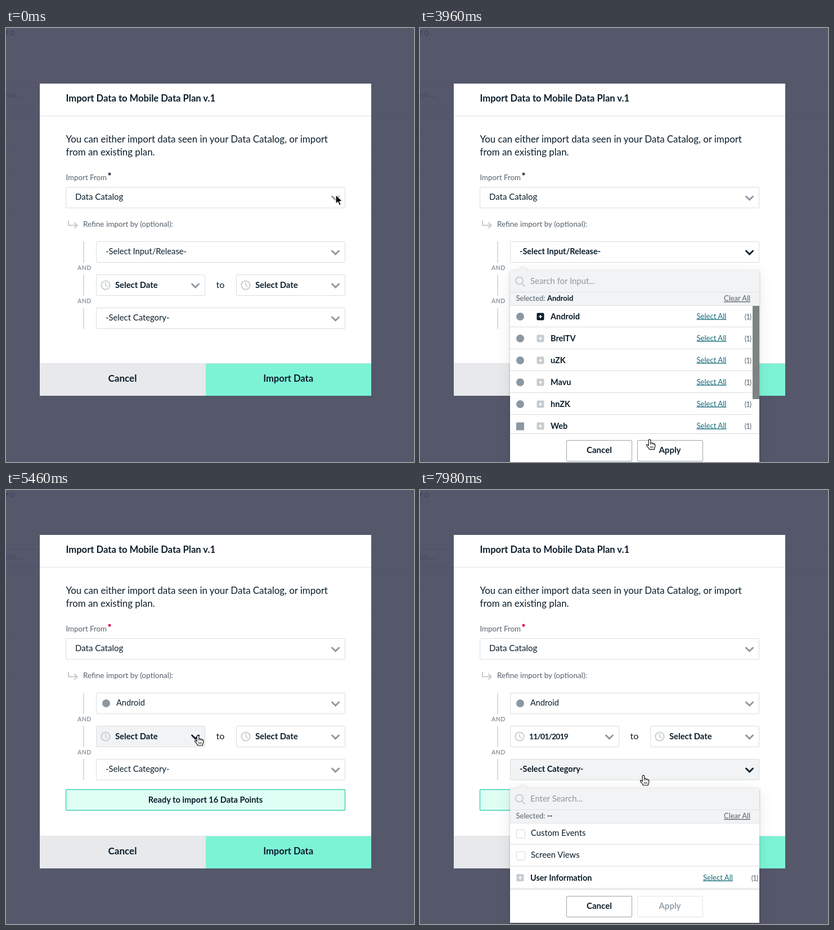
An HTML page for the animation above (8000 ms loop, 725 by 773 pixels).

```html
<!DOCTYPE html>
<html lang="en">
<head>
<meta charset="utf-8">
<title>Import data dialog</title>
<style>
  html, body { margin: 0; width: 100%; height: 100%; overflow: hidden; background: #55576b; }
  svg { display: block; width: 100%; height: 100%; font-family: Lato, "Open Sans", sans-serif; }
  .pop { filter: drop-shadow(0 1px 2px rgba(0,0,0,.22)) drop-shadow(0 6px 14px rgba(0,0,0,.07)); }
</style>
</head>
<body>
<svg id="stage" viewBox="0 0 725 773" preserveAspectRatio="xMinYMin meet"></svg>
<script>
const LOOP = 8000, STEP = 60;
const INK = '#0b1d2a', SLATE = '#55616b', GREY = '#8c98a1', PALE = '#bcc3c8',
      EDGE = '#dadedf', MIST = '#f1f3f5', MINT = '#7df3d6', TEAL = '#146b78', GREEN = '#14cfa2';
const BOLD = 'font-weight="700"', MID = 'text-anchor="middle"', UNDER = 'text-decoration="underline"',
      TIGHT = 'letter-spacing="-.8"';

// Moments at which the dialog changes
const OPEN_INPUT = 1920, PICK = 3240, LOAD_1 = 4080, READY_1 = 4860,
      OPEN_DATE = 5820, LOAD_2 = 6780, READY_2 = 6960, OPEN_CATEGORY = 7980;

// Pointer stops: time, x, y and an optional control point of the way there
const STOPS = [
  [0, 586, 297], [1080, 586, 297], [1560, 585, 395], [2400, 585, 395],
  [3180, 269, 514], [3420, 269, 514], [4020, 412, 739], [4980, 412, 739],
  [5460, 341, 437, 471, 480], [5700, 337, 436], [5880, 337, 436],
  [6660, 331, 576], [7380, 331, 576], [7800, 397, 508]
];
const HAND_TIMES = [[240, 1260], [1400, LOAD_1], [5340, LOAD_2], [7660, LOOP]];

const within = (t, a, b) => t >= a && t < b;
const clamp = v => Math.max(0, Math.min(1, v));
const smooth = v => v * v * (3 - 2 * v);
const pulse = (t, a, b) => clamp((t - a) / 140) * (1 - clamp((t - b) / 140));

const text = (x, y, str, size, fill = INK, more = '') =>
  `<text x="${x}" y="${y}" font-size="${size}" fill="${fill}" ${more}>${str}</text>`;
const rect = (x, y, w, h, fill, more = '') =>
  `<rect x="${x}" y="${y}" width="${w}" height="${h}" fill="${fill}" ${more}/>`;
const line = (d, stroke, width = 1, more = '') =>
  `<path d="${d}" fill="none" stroke="${stroke}" stroke-width="${width}" ${more}/>`;
const dot = (x, y, r, fill) => `<circle cx="${x}" cy="${y}" r="${r}" fill="${fill}"/>`;
const box = (x, y, w, h, fill, stroke, width = 1) =>
  rect(x, y, w, h, fill, `rx="1.5" stroke="${stroke}" stroke-width="${width}"`);
const group = (x, y, body, more = '') => `<g transform="translate(${x} ${y})" ${more}>${body}</g>`;

function chevron(x, y, dark) {
  return line(`M${x - 6} ${y - 3}l6 6l6-6`, dark ? INK : GREY, 3, 'stroke-linecap="round"');
}

function clock(x, y) {
  return `<circle cx="${x}" cy="${y}" r="7.7" fill="none" stroke="#c3c9ce" stroke-width="1.8"/>` +
    line(`M${x} ${y - 5}v5l3.5 3`, '#c3c9ce', 1.6);
}

// Select field; glow runs from 0 (idle) to 1 (hovered)
function field(x, y, w, glow, open) {
  return box(x, y, w, 37, '#fff', EDGE) +
    (glow ? rect(x, y, w, 37, MIST, `rx="1.5" stroke="${EDGE}" opacity="${glow}"`) : '') +
    chevron(x + w - 17, y + 19.5, open || glow > .5);
}

function dateField(x, glow, label, ink) {
  const digits = /\d/.test(label);
  return field(x, 340.5, 193, glow) + clock(x + 16.5, 359) +
    text(x + 33.5, 364, label, digits ? 13.8 : 14.8, ink, digits ? `${BOLD} ${TIGHT}` : BOLD);
}

function backdrop() {
  const rules = [97, 151, 210, 262, 330].map(y => `M0 ${y}.5h725`).join('');
  return rect(0, 0, 725, 773, '#55576b') +
    line(rules, '#4b4e63', 1, 'opacity=".3" stroke-dasharray="2 1"') +
    line('M0 105.5h60M0 137.5h60', '#4b4e63', 1, 'opacity=".3"') +
    text(-1, 13, 'FO', 11, '#3a465e', BOLD + ' letter-spacing="2"') +
    text(-1, 124, 'nts...', 14, '#434b62') + text(-1, 182, '.', 14, '#3a465e');
}

function spinner(t) {
  const half = line('M-14-1A14 14 0 0 1 11.5-7', GREY, 4) +
    line('M14.3-15V-5H4.5', GREY, 3.6, 'stroke-linejoin="round"');
  return `<g transform="translate(355 521) rotate(${(t - 4440) * .18})">` +
    half + `<g transform="rotate(180)">${half}</g></g>`;
}

function dialog(t, s) {
  const ink = s.loading ? '#949fa7' : INK;
  const openInput = within(t, OPEN_INPUT, LOAD_1), openCategory = t >= OPEN_CATEGORY;
  const hover = [pulse(t, 180, 1220), pulse(t, 1390, 2560), pulse(t, 5310, 6120), pulse(t, 7640, 9000)];
  const foot = s.height - 58;
  let out = rect(60, 0, 589, s.height, '#fff') +
    text(106.5, 32, 'Import Data to Mobile Data Plan v.1', 16.6, INK, BOLD) +
    line('M60 57.5H649', '#dfe2e4') +
    text(106.5, 104.5, 'You can either import data seen in your Data Catalog, or import', 16.85) +
    text(106.5, 127.5, 'from an existing plan.', 16.85) +
    text(106.5, 172, 'Import From', 13.3, SLATE) +
    dot(184, 161, 2.5, t < LOAD_1 ? '#454962' : '#dc1f54');

  if (hover[0]) out += rect(104.5, 182.5, 500, 41, '#dfe3e6', `rx="3" opacity="${hover[0] * .5}"`);
  out += field(106.5, 184.5, 496, hover[0]) + text(123, 207, 'Data Catalog', 15) +
    line('M111 244v8.5h15M121.5 247.5l5 5l-5 5', '#c3c9ce', 2) +
    text(137, 255, 'Refine import by (optional):', 13.5, SLATE) +
    line('M138 281v38M138 340v38M138 399v38', '#d9dde0', 2);
  for (const y of [332, 391]) out += text(139.3, y, 'AND', 10.6, GREY, `${BOLD} ${MID} letter-spacing=".3"`);

  out += field(160.5, 281.5, 442, hover[1], openInput);
  out += t < LOAD_1
    ? text(177, 304, '-Select Input/Release-', openInput ? 14.5 : 14.75, INK, openInput ? BOLD : '')
    : dot(178, 300, 7, GREY) + text(196, 304, 'Android', 14.5, ink);

  out += dateField(160.5, hover[2], t < LOAD_2 ? 'Select Date' : '11/01/2019', ink) +
    text(381, 364, 'to', 16, s.loading ? '#6e7a84' : INK, MID) +
    dateField(409.5, 0, 'Select Date', ink) +
    field(160.5, 399.5, 442, hover[3], openCategory) +
    text(177, 422, '-Select Category-', openCategory ? 14.6 : 14.8, ink, openCategory ? BOLD : '');

  if (s.loading) {
    out += spinner(t) + text(354.5, 563.5, 'Loading...', 17.2, PALE, MID);
  } else if (t >= READY_1) {
    out += box(106.5, 453.5, 496, 37, '#defef4', '#3ccfae', 1.4) +
      text(354.5, 476.5, 'Ready to import 16 Data Points', 14.6, INK, `${BOLD} ${MID}`);
  }
  return out + rect(60, foot, 295, 58, '#e7e9eb') +
    rect(355, foot, 294, 58, s.loading ? '#fff' : MINT) +
    line(`M60 ${foot + .5}H649`, '#dfe2e4', 1, s.loading ? '' : 'opacity=".6"') +
    text(207, s.height - 25, 'Cancel', 17, INK, `${BOLD} ${MID}`) +
    text(501.7, s.height - 25, 'Import Data', 16.5, s.loading ? GREY : INK, `${BOLD} ${MID}`);
}

function plusBox(x, y, fill) {
  return rect(x - 6.5, y - 6.5, 13, 13, fill, 'rx="2"') +
    line(`M${x - 3} ${y}h6M${x} ${y - 3}v6`, '#fff', 1.7);
}

// Shared frame of both lists; y = 0 is the top of the select field
function list(hint, chosen, foot, active, rows) {
  return rect(160, 52, 443, foot + 60 - 52, '#fff') +
    `<path d="M174 52.5l9-8l9 8z" fill="${MIST}"/>` + rect(160, 52, 443, 62, MIST) +
    `<circle cx="176.5" cy="70" r="6.5" fill="none" stroke="${PALE}" stroke-width="1.5"/>` +
    line('M181 75l5.5 5.5', PALE, 1.6) +
    text(196, 75.5, hint, 14.9, '#8e979e') +
    line('M160 90.5H603M160 114.5H603', '#dfe3e5') +
    text(170.5, 106, `Selected: <tspan fill="${INK}" ${BOLD}>${chosen}</tspan>`, 13, SLATE) +
    text(587, 106, 'Clear All', 12.9, SLATE, `text-anchor="end" ${UNDER}`) +
    rows + line(`M160 ${foot + .5}H603`, '#d5dadd') +
    box(260.5, foot + 12.5, 116, 37, '#fff', '#9aa4ac') +
    box(386.5, foot + 12.5, 116, 37, '#fff', active ? '#9aa4ac' : '#dfe3e5') +
    text(318.5, foot + 35, 'Cancel', 15, INK, `${BOLD} ${MID}`) +
    text(444, foot + 35, 'Apply', 15, active ? INK : '#949fa7', `${BOLD} ${MID}`);
}

function inputList(t, hoverRow) {
  const names = ['Android', 'BrelTV', 'uZK', 'Mavu', 'hnZK', 'Web'];
  const picked = t >= PICK;
  const rows = names.map((name, i) => {
    const y = 133.5 + 39 * i, lit = i === hoverRow;
    const mark = i === 5 ? rect(171, y - 6, 14, 14, GREY) : dot(178, y + .5, 7, GREY);
    return (lit ? rect(160, y - 18.5, 431, 37, MIST) : '') + mark +
      plusBox(214, y + .5, lit || (picked && i === 0) ? INK : '#c6cbcf') +
      text(232, y + 5, name, 14.5, INK, BOLD) +
      text(491.5, y + 4, 'Select All', 13.1, TEAL, UNDER) +
      text(582.5, y + 5.5, '(1)', 12.5, SLATE, `${MID} ${TIGHT}`) +
      (i < 5 ? line(`M160 ${y + 19}H591`, EDGE) : '');
  }).join('') + rect(591, 115, 12, 166, '#7b8383');
  return list('Search for Input...', picked ? 'Android' : '--', 342, picked, rows);
}

function categoryList() {
  const rows = ['Custom Events', 'Screen Views'].map((name, i) => {
    const y = 132.5 + 39 * i;
    return box(171.5, y - 6.5, 15, 15, '#fff', '#d3d8db') + text(197, y + 4.5, name, 14.8) +
      line(`M160 ${y + 19.5}H603`, EDGE);
  }).join('') + plusBox(178, 211.5, '#c6cbcf') +
    text(196, 216.5, 'User Information', 14.5, INK, BOLD) +
    text(503, 215.5, 'Select All', 13.1, TEAL, UNDER) +
    text(594.5, 216.5, '(1)', 12.5, SLATE, `${MID} ${TIGHT}`) + line('M160 230.5H603', EDGE);
  return list('Enter Search...', '--', 232, false, rows);
}

function calendar(t) {
  const cols = [140, 180.5, 217.5, 255, 293, 331, 373];
  let out = rect(99, 465, 316, 340, '#fff', 'rx="1" stroke="#d5dadd"') +
    dot(140, 487, 13, MIST) + dot(373, 487, 13, MIST) +
    line('M142 482l-5 5l5 5M371 482l5 5l-5 5', SLATE, 1.6) +
    text(256, 494, 'November 2019', 16.4, INK, `${BOLD} ${MID}`) + line('M99 511.5H415', '#dfe3e5');
  cols.forEach((x, i) => out += text(x, 544, 'SMTWTFS'[i], 14, GREEN, `${BOLD} ${MID}`));
  for (let i = 0; i < 42; i++) {
    const before = i < 5, after = i > 34, past = i > 28;
    const day = before ? 27 + i : after ? i - 34 : i - 4;
    const fill = before ? '#aab0b5' : after ? '#ccd1d4' : past ? '#b2b8bd'
      : i === 5 && t >= 6600 ? GREEN : '#4d5963';
    const style = (before || after ? '' : BOLD) + (past ? ' text-decoration="line-through"' : '');
    out += text(cols[i % 7], 581.5 + 32.7 * Math.floor(i / 7), day, 14.7, fill, `${MID} ${style}`);
  }
  return out + box(127.5, 768.5, 124, 37, '#fff', '#9aa4ac') + box(262.5, 768.5, 124, 37, '#fff', '#9aa4ac');
}

function pointer(t) {
  let i = STOPS.length - 1;
  while (STOPS[i][0] > t) i--;
  const a = STOPS[i], b = STOPS[i + 1] || a;
  const e = b === a ? 0 : smooth((t - a[0]) / (b[0] - a[0]));
  const along = k => {
    const mid = b.length > 3 ? b[k + 2] : (a[k] + b[k]) / 2;
    return (1 - e) ** 2 * a[k] + 2 * e * (1 - e) * mid + e * e * b[k];
  };
  return { x: along(1), y: along(2), hand: HAND_TIMES.some(([from, to]) => within(t, from, to)) };
}

function drawPointer({ x, y, hand }) {
  const shape = hand
    ? '<path d="M-1.8 11.2V1.9a1.8 1.8 0 0 1 3.6 0V7c.3-1.4 3-1.2 3.1.3c.6-1 2.7-.7 2.8.8c.8-.6 2 0 2 1.3v3c0 1.6-1.2 2.6-1.5 5.6H-.4c-.6-2.8-3.6-4.7-4.9-7c-.8-1.5 1-2.4 2-1.4z" fill="#fff" stroke="#111" stroke-width="1.2" stroke-linejoin="round"/>' +
      line('M1.8 7v2.5M4.9 7.5v2M7.7 8.3v1.6M1.6 12v3.5M3.8 12v3.5M6 12v3.5', '#111', .9)
    : '<path d="M0 0V16.4L3.8 12.8L6.4 18.9L9.2 17.7L6.6 11.8H11.8Z" fill="#000" stroke="#fff" stroke-width="1.2" stroke-linejoin="round"/>';
  return group(x.toFixed(2), y.toFixed(2), shape);
}

function stateAt(t) {
  const loading = within(t, LOAD_1, READY_1) || within(t, LOAD_2, READY_2);
  const height = t < LOAD_1 ? 556 : loading ? 674 : 594;
  return { loading, height, top: t < LOAD_1 ? 99 : loading ? 40 : 80 };
}

function render(t) {
  const s = stateAt(t), p = pointer(t);
  let out = backdrop() + group(0, s.top, dialog(t, s));
  if (within(t, OPEN_INPUT, LOAD_1)) {
    const row = p.x < 591 && p.y > 494 && p.y < 722 ? Math.floor((p.y - 494) / 39) : -1;
    out += group(0, s.top + 281, inputList(t, row), 'class="pop"');
  }
  if (within(t, OPEN_DATE, LOAD_2)) out += group(0, 0, calendar(t), 'class="pop"');
  if (t >= OPEN_CATEGORY) out += group(0, s.top + 399, categoryList(), 'class="pop"');
  stage.innerHTML = out + drawPointer(p);
}

const stage = document.getElementById('stage');
const start = performance.now();
let shown = -1;
function tick() {
  const t = Math.floor((performance.now() - start) % LOOP / STEP) * STEP;
  if (t !== shown) render(shown = t);
  requestAnimationFrame(tick);
}
tick();
</script>
</body>
</html>
```
